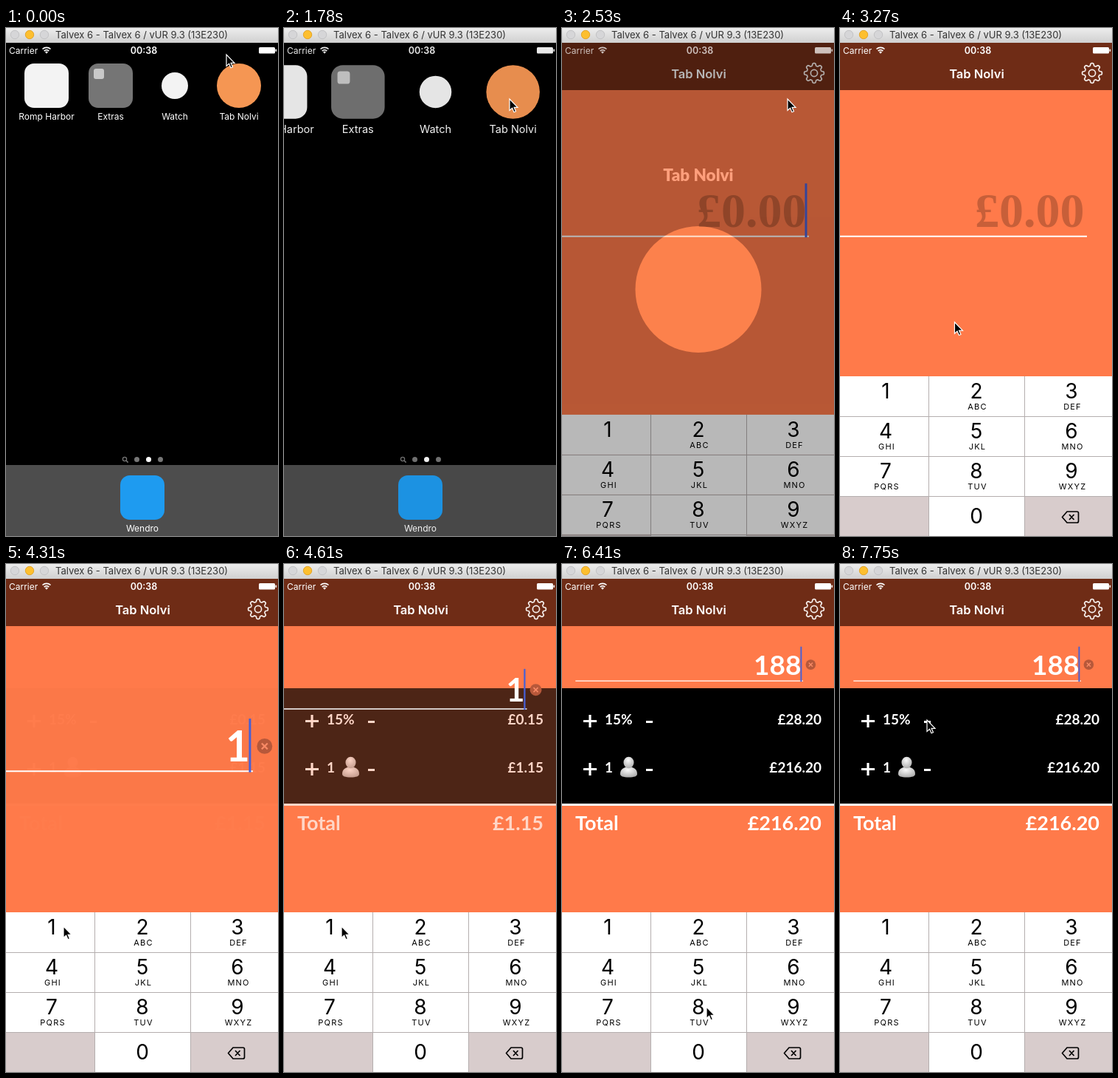
Write an HTML page that moves like this. It is 369x687 px and loops after 8000 ms.

```html
<!DOCTYPE html>
<html lang="en">
<head>
<meta charset="utf-8">
<title>Tip calculator demo</title>
<style>
  html, body { margin: 0; width: 100%; height: 100%; overflow: hidden; background: #000; }
  svg { display: block; width: 100%; height: 100%; }
  text { font-family: Inter, Roboto, sans-serif; white-space: pre; }
  .mid { text-anchor: middle; }
  .end { text-anchor: end; }
  .label { font-size: 12px; fill: #fff; text-anchor: middle; }
  .bold text, text.bold { font-family: Lato, "Open Sans", sans-serif; font-weight: 700; fill: #fff; }
  .row { font-size: 19px; }
  .total { font-size: 27px; }
</style>
</head>
<body>
<svg viewBox="0 0 369 687" xmlns="http://www.w3.org/2000/svg">
  <defs>
    <linearGradient id="chrome" x2="0" y2="1">
      <stop stop-color="#ededed"/><stop offset="1" stop-color="#d0d0d0"/>
    </linearGradient>
    <radialGradient id="bust" cx=".45" cy=".3" r=".75">
      <stop stop-color="#fafafa"/><stop offset="1" stop-color="#a9a9a9"/>
    </radialGradient>
  </defs>
  <rect width="369" height="687"/>

  <g id="home">
    <g id="icons">
      <rect x="25" y="48" width="60" height="60" rx="13" fill="#f3f3f3"/>
      <rect x="112" y="48" width="60" height="60" rx="13" fill="#757575"/>
      <rect x="119" y="55" width="14" height="14" rx="3" fill="#c9c9c9"/>
      <circle cx="229" cy="78" r="18" fill="#f3f3f3"/>
      <circle cx="316" cy="78" r="30" fill="#f59653"/>
      <text class="label" x="55" y="124">Romp Harbor</text>
      <text class="label" x="142" y="124">Extras</text>
      <text class="label" x="229" y="124">Watch</text>
      <text class="label" x="316" y="124">Tab Nolvi</text>
    </g>
    <g fill="#777">
      <circle cx="161" cy="583" r="2.6" fill="none" stroke="#777" stroke-width="1.3"/>
      <path d="M163 585l2.6 2.6" stroke="#777" stroke-width="1.6"/>
      <circle cx="177.5" cy="583.5" r="3.5"/>
      <circle cx="193.5" cy="583.5" r="3.5" fill="#fff"/>
      <circle cx="209.5" cy="583.5" r="3.5"/>
    </g>
    <rect y="591" width="369" height="96" fill="#4d4d4d"/>
    <rect x="155" y="605" width="60" height="60" rx="13" fill="#1e9bf0"/>
    <text class="label" x="185" y="681">Wendro</text>
  </g>

  <g id="app">
    <rect y="20" width="369" height="667" fill="#ff7a4a"/>
    <rect y="20" width="369" height="64" fill="#6f2c16"/>
    <text class="mid" x="185.5" y="68" font-size="16.5" font-weight="600" fill="#fff">Tab Nolvi</text>
    <g transform="translate(342 61)" fill="none" stroke="#f6efec" stroke-width="1.7" stroke-linejoin="round">
      <path id="gear"/><circle r="4.6"/>
    </g>

    <g id="details" class="bold">
      <rect y="168" width="369" height="156"/>
      <rect y="324" width="369" height="3" fill="#fff"/>
      <path d="M29 212.5h18M38 204v17M114 213.5h9M29 277.5h18M38 269v17M114 278.5h9" stroke="#fff" stroke-width="3.2"/>
      <text class="row" x="58" y="217">15%</text>
      <text class="row" x="58" y="282">1</text>
      <path d="M79 284c0-7 5-9.5 11.5-9.5s11.5 2.5 11.5 9.5c0 3-4 4.5-11.5 4.5s-11.5-1.5-11.5-4.5z" fill="url(#bust)"/>
      <ellipse cx="90.5" cy="268.5" rx="7" ry="7.8" fill="url(#bust)"/>
      <text id="tip" class="row end" x="352" y="217"></text>
      <text id="share" class="row end" x="352" y="282"></text>
      <text class="total" x="18" y="360">Total</text>
      <text id="total" class="total end" x="352" y="360"></text>
    </g>

    <g id="field">
      <path d="M-475 0H0" stroke="#fff" stroke-width="1.9"/>
      <text id="hint" class="end" x="-3.5" y="-12.5" font-size="66" style="font-family:'Liberation Serif',serif;font-weight:700" fill-opacity=".22">£0.00</text>
      <text id="bill" class="bold end" x="-4" y="-13" font-size="57"></text>
      <path id="caret" d="M-4 -71.5V1.5" stroke="#4660d6" stroke-width="3"/>
      <g id="clear" transform="translate(16 -34)">
        <circle r="10.5" fill="#b7583a"/>
        <path d="M-4-4L4 4M4-4L-4 4" stroke="#f98a66" stroke-width="2.2"/>
      </g>
    </g>

    <g id="keyboard"></g>
  </g>

  <g id="splash">
    <rect y="20" width="369" height="667"/>
    <circle cx="185" cy="353.5" r="85.5" fill="#f59653"/>
    <text class="mid" x="185" y="207" font-size="22.5" style="font-family:Lato,sans-serif;font-weight:900" fill="#fff">Tab Nolvi</text>
  </g>

  <g id="status" fill="#fff">
    <text x="4" y="34.5" font-size="12">Carrier</text>
    <path d="M49.5 28.5a8 8 0 0 1 11 0M51.7 31a5 5 0 0 1 6.6 0" fill="none" stroke="#fff" stroke-width="1.7"/>
    <path d="M53 32.5a3 3 0 0 1 4 0l-2 2.3z"/>
    <text class="mid" x="187" y="34.5" font-size="12.5" font-weight="600">00:38</text>
    <rect x="343" y="26" width="22" height="8.5" rx="1.5"/>
    <rect x="365.5" y="28.5" width="1.6" height="3.5" rx=".8"/>
  </g>

  <rect width="369" height="20" fill="url(#chrome)"/>
  <g stroke="#c3c3c5" fill="#d6d6d8">
    <circle cx="12" cy="9" r="5.7"/>
    <circle cx="32" cy="9" r="5.7" fill="#fdbf2f" stroke="#e3a52a"/>
    <circle cx="52" cy="9" r="5.7"/>
  </g>
  <text x="67" y="14" font-size="13" fill="#333">Talvex 6 - Talvex 6 / vUR 9.3 (13E230)</text>

  <path id="pointer" d="M0 0V15.5L3.6 12.2 6 17.8 8.5 16.7 6.1 11.3H11Z" stroke="#fff" stroke-width="1.2"/>
</svg>

<script>
const LOOP = 8000, STEP = 149.2, FIRST = 140, LAST_STEP = 51;
const $ = id => document.getElementById(id);
const show = (id, on) => $(id).setAttribute('display', on ? 'inline' : 'none');
const fade = (id, alpha) => { $(id).setAttribute('opacity', alpha); show(id, alpha > 0); };
const move = (id, value) => $(id).setAttribute('transform', value);
const mix = (a, b, p) => a + (b - a) * p;
const easeInOut = p => p < .5 ? 2 * p * p : 1 - 2 * (1 - p) ** 2;
const clamp = p => Math.min(1, Math.max(0, p));

// Linear interpolation over [time, value, ...] stops; returns all values.
function track(t, stops) {
  const i = stops.findIndex(s => s[0] > t);
  if (i === 0) return stops[0].slice(1);
  if (i < 0) return stops[stops.length - 1].slice(1);
  const [a, b] = [stops[i - 1], stops[i]];
  return a.slice(1).map((v, n) => mix(v, b[n + 1], (t - a[0]) / (b[0] - a[0])));
}

const POINTER = [
  [0, 299, 36], [139, 299, 36], [140, 304, 72], [280, 306, 96], [2700, 306, 96],
  [2830, 299, 120], [3270, 156, 397], [3570, 104, 468], [3800, 78, 490], [4930, 78, 490],
  [5060, 92, 515], [5360, 178, 656], [5510, 190, 620], [5650, 196, 599], [6730, 196, 599],
  [6860, 186, 572], [7160, 132, 400], [7450, 106, 250], [7740, 118, 211]
];
const ZOOM = [[1740, 0, 0], [1781, .04, .03], [1931, .46, .38], [2079, .807, .742], [2225, 1, 1]];
const SPLASH_FADE = [[2230, 1], [2378, .75], [2527, .28], [2670, 0]];
const KEYBOARD_DROP = [[2230, 216], [2378, 150], [2527, 52], [2676, 7], [2800, 0]];
const PRESSES = [['1', 4000, 4250], ['8', 5640, 5800], ['8', 6100, 6400]];

function buildKeyboard() {
  const letters = ['', 'ABC', 'DEF', 'GHI', 'JKL', 'MNO', 'PQRS', 'TUV', 'WXYZ'];
  const edges = [0, 120.5, 250.5, 369], centers = [62, 185, 314];
  let out = '';
  for (let i = 0; i < 12; i++) {
    const col = i % 3, y = 471 + 54 * Math.floor(i / 3), x = centers[col];
    const digit = i < 9 ? i + 1 : i === 10 ? 0 : '';
    out += `<rect id="key${digit === '' ? 'blank' + i : digit}" x="${edges[col]}" y="${y}" width="${edges[col + 1] - edges[col]}" height="54" fill="${digit === '' ? '#d8cccc' : '#fff'}"/>`;
    out += `<text class="mid" x="${x}" y="${y + (i < 9 ? 30 : 37)}" font-size="28">${digit}</text>`;
    if (letters[i]) out += `<text class="mid" x="${x + 1.5}" y="${y + 45}" font-size="11" letter-spacing="1.2">${letters[i]}</text>`;
  }
  out += '<path d="M0 525.5H369M0 579.5H369M0 633.5H369M120.5 471V687M250.5 471V687" stroke="#b4aeae"/>';
  out += '<path d="M301.5 661.5l6.5-7.5h13.5a2 2 0 0 1 2 2v11a2 2 0 0 1-2 2H308zM311 658l6.5 7M317.5 658l-6.5 7" fill="none" stroke="#000" stroke-width="1.7" stroke-linejoin="round"/>';
  $('keyboard').innerHTML = out;
}

// Eight rounded teeth from a softened square wave.
function buildGear() {
  const points = [];
  for (let i = 0; i < 160; i++) {
    const a = i * Math.PI / 80, r = 11.7 + 1.75 * Math.tanh(2 * Math.cos(8 * a));
    points.push((r * Math.cos(a)).toFixed(2) + ' ' + (r * Math.sin(a)).toFixed(2));
  }
  $('gear').setAttribute('d', 'M' + points.join('L') + 'Z');
}

function drawLaunch(t) {
  const [zx, zy] = track(t, ZOOM), [alpha] = track(t, SPLASH_FADE);
  const cx = mix(316, 184.5, zx), cy = mix(78, 353.5, zy);
  const sx = mix(60 / 369, 1, zx), sy = mix(60 / 667, 1, zy);
  move('splash', `translate(${cx} ${cy}) scale(${sx} ${sy}) translate(-184.5 -353.5)`);
  fade('splash', alpha * clamp(zx * 2 - .2));
  fade('home', clamp(1 - zx * 1.35));
  move('icons', `translate(${cx} ${cy}) scale(${sx * 369 / 60}) translate(-316 -78)`);
  show('app', t > 2300);
  const [dim] = track(t, [[1740, 1], [1931, .6], [2079, .25], [2225, 0]]);
  $('status').setAttribute('opacity', Math.max(dim, 1 - alpha));
}

function drawCalculator(t) {
  const bill = t < 4250 ? '' : t < 5800 ? '1' : t < 6400 ? '18' : '188';
  const p = easeInOut(clamp((t - 4275) / 560));
  move('field', `translate(${mix(335, 327, p)} ${mix(281.7, 158.2, p)}) scale(${mix(1, .65, p)})`);
  fade('details', p);
  show('hint', !bill);
  show('clear', bill);
  $('bill').textContent = bill;
  $('tip').textContent = '£' + (bill * .15).toFixed(2);
  $('share').textContent = $('total').textContent = '£' + (bill * 1.15).toFixed(2);

  const lastInput = [6400, 5800, 4250, 2430].find(s => t >= s) ?? 0;
  const blink = (t - lastInput) % 1000;
  show('caret', blink < 450 || blink > 900);

  move('keyboard', `translate(0 ${track(t, KEYBOARD_DROP)[0]})`);
  for (const key of ['1', '8']) {
    const down = PRESSES.some(([k, from, to]) => k === key && t >= from && t < to);
    $('key' + key).setAttribute('fill', down ? '#d8cccc' : '#fff');
  }
}

function render(ms) {
  const step = Math.min(LAST_STEP, Math.floor((ms - 132) / STEP));
  const t = step < 0 ? 0 : FIRST + step * STEP;
  drawLaunch(t);
  drawCalculator(t);
  const [x, y] = track(t, POINTER);
  move('pointer', `translate(${x} ${y})`);
}

buildKeyboard();
buildGear();
const start = performance.now();
function tick() {
  render((performance.now() - start) % LOOP);
  requestAnimationFrame(tick);
}
tick();
</script>
</body>
</html>
```
